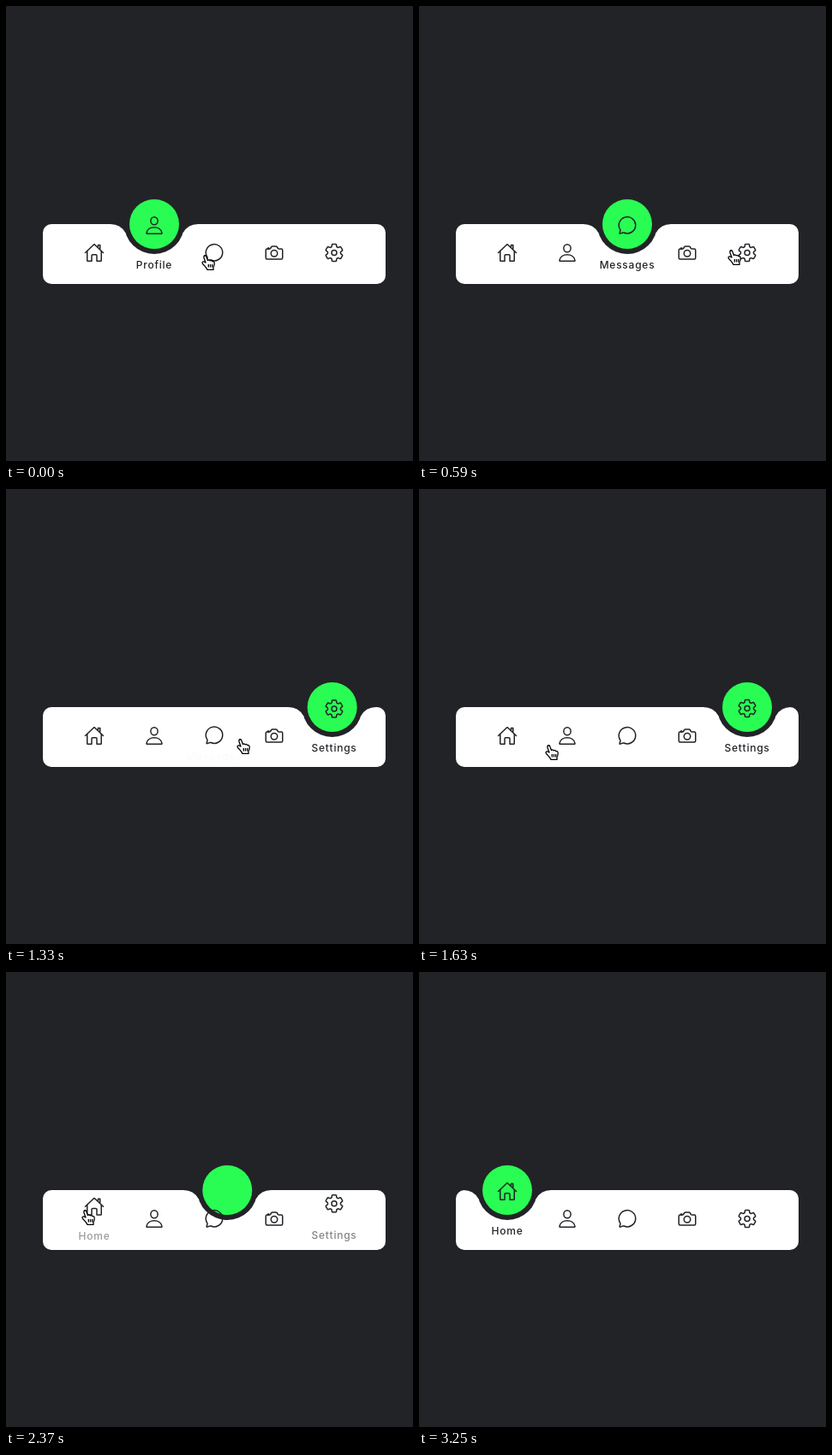
An HTML page that plays this animation: 475x532 px, repeating every 3850 ms.

```html
<!DOCTYPE html>
<html lang="en">
<head>
<meta charset="utf-8">
<title>Navigation bar</title>
<style>
  html, body { margin: 0; width: 100%; height: 100%; overflow: hidden; background: #222327; }
  svg { display: block; }
  .icon { fill: none; stroke: #222327; stroke-width: 32; stroke-linecap: round; stroke-linejoin: round; }
  text { font: 500 12px Inter, sans-serif; letter-spacing: .75px; text-anchor: middle; fill: #222327; }
</style>
</head>
<body>
<svg width="475" height="532" viewBox="0 0 475 532">
  <rect x="43" y="255" width="400" height="70" rx="10" fill="#fff"/>
  <g id="bubble">
    <path d="M-51 0A20 20 0 0 1-33.7 10H33.7A20 20 0 0 1 51 0Z" fill="#222327"/>
    <circle r="35" fill="#222327"/>
    <circle r="29" fill="#29fd53"/>
  </g>
  <g id="items"></g>
  <g id="hand" fill="#fff" stroke="#000" stroke-width="1.3" stroke-linejoin="round">
    <path d="M5 9L3 3.500C2.500 0 5.500 0 6 2.500L7.500 6.500Q9 5 10 6.800Q12 5.800 12.500 7.600Q15 7 15.200 9.500Q15.500 12 14 14.500V17.400H7Q6 15 2 11C-.5 8 2.500 6.800 5 9Z"/>
    <path d="M8.300 11v3.500m2.200-3.500v3.500m2.200-3.500v3.500"/>
  </g>
  <path id="arrow" d="M.5.5v14l3.200-3 2 4.800 2-.8-2-4.700h4.400z" fill="#000" stroke="#fff"/>
</svg>
<script>
// Time runs in beats; the picture holds still within each one
const LOOP = 3850, BEAT = 147.73, LEAD = 8;
const GLIDE = 10 / 3;
const $ = id => document.getElementById(id);

// Six teeth, each mirrored about its own axis: [degrees, radius]
function gear() {
  const half = [[-26, 160], [-21, 167], [-14.7, 212], [-11.4, 218]];
  const tooth = [...half, ...half.map(([a, r]) => [-a, r]).reverse()];
  const points = [];
  for (let k = 0; k < 6; k++)
    for (const [a, r] of tooth) {
      const q = (a + 60 * k) * Math.PI / 180;
      points.push([256 + r * Math.sin(q), 256 - r * Math.cos(q)].map(v => v.toFixed(1)));
    }
  return `<path d="M${points.join("L")}Z"/><circle cx="256" cy="256" r="64"/>`;
}

const items = [
  ["Home", `<path d="M80 212v236q0 16 16 16h96V328q0-24 24-24h80q24 0 24 24v136h96q16 0 16-16V212"/>
    <path d="M480 256L267 52q-11-8-22 0L32 256M400 179V64h-48v69"/>`],
  ["Profile", `<ellipse cx="256" cy="144" rx="88" ry="96"/>
    <path d="M64 443c17-91 105-139 192-139s175 48 192 139q2 21-16 21H80q-18 0-16-21z"/>`],
  ["Messages", `<path d="M87 380q3-6-6-19A208 205 0 1 1 172 438q-11-4-23 0l-68 24q-16 3-13-13z"/>`],
  ["Camera", `<path d="M372 160h60q32 0 32 32v192q0 32-32 32H80q-32 0-32-32V192q0-32 32-32h60q13 0 22-11l26-42q9-11 22-11h92q13 0 22 11l26 42q9 11 22 11z"/>
    <circle cx="256" cy="272" r="80"/><path d="M124 158v-22h-24v22"/>`],
  ["Settings", gear()]
];

const centre = i => 103 + 70 * i;
$("items").innerHTML = items.map(([label, art], i) =>
  `<g transform="translate(${centre(i)} 0)"><g class="icon">${art}</g><text>${label}</text></g>`).join("");
const nodes = [...$("items").children];

// Selections: [beat, from, to]
const moves = [[.03, 1, 2], [6.22, 2, 4], [15.11, 4, 0]];

// Where the pointer turns or changes speed: [beat, x, y]
const route = [
  [0, 228, 291], [1, 240, 292], [2, 338, 288], [5, 371, 284], [8, 363, 285],
  [10, 174, 299], [11, 147, 299], [13, 121, 293], [14, 90, 278], [16, 88, 278],
  [18, 155, 306], [19, 238, 344], [20, 319, 392], [21, 385, 467]
];
const BAR_BOTTOM = 325;

// cubic-bezier(.25, .1, .25, 1)
function ease(x) {
  if (x <= 0 || x >= 1) return x <= 0 ? 0 : 1;
  const bezier = (u, a, b) => 3 * (1 - u) ** 2 * u * a + 3 * (1 - u) * u * u * b + u ** 3;
  let lo = 0, hi = 1;
  for (let i = 0; i < 24; i++) {
    const mid = (lo + hi) / 2;
    if (bezier(mid, .25, .25) < x) lo = mid; else hi = mid;
  }
  return bezier(lo, .1, 1);
}

const mix = (a, b, p) => a + (b - a) * p;
const place = (node, x, y, more = "") => node.setAttribute("transform", `translate(${x} ${y}) ${more}`);
const show = (node, on) => node.setAttribute("visibility", on ? "visible" : "hidden");

function drawMenu(beat) {
  const [start, from, to] = moves.filter(m => m[0] <= beat).pop() || moves[0];
  const p = ease((beat - start) / GLIDE);
  place($("bubble"), mix(centre(from), centre(to), p), 255);
  nodes.forEach((node, i) => {
    const active = i === to ? p : i === from ? 1 - p : 0;
    const [icon, label] = node.children;
    place(icon, -12, 276.5 - 32 * active, "scale(.046875)");
    label.setAttribute("y", 317.3 - 10 * active);
    label.setAttribute("opacity", active);
  });
}

function drawPointer(beat) {
  const next = route.findIndex(k => k[0] >= beat);
  const visible = next >= 0;
  const b = route[Math.max(next, 0)], a = route[Math.max(next - 1, 0)];
  const p = (beat - a[0]) / (b[0] - a[0] || 1);
  const x = Math.round(mix(a[1], b[1], p)), y = Math.round(mix(a[2], b[2], p));
  const outside = y > BAR_BOTTOM;
  show($("hand"), visible && !outside);
  show($("arrow"), visible && outside);
  place($(outside ? "arrow" : "hand"), x, y);
}

const begin = performance.now();
function tick() {
  const time = (performance.now() - begin) % LOOP;
  const beat = Math.floor((time + LEAD) / BEAT);
  drawMenu(beat);
  drawPointer(beat);
  requestAnimationFrame(tick);
}
tick();
</script>
</body>
</html>
```
